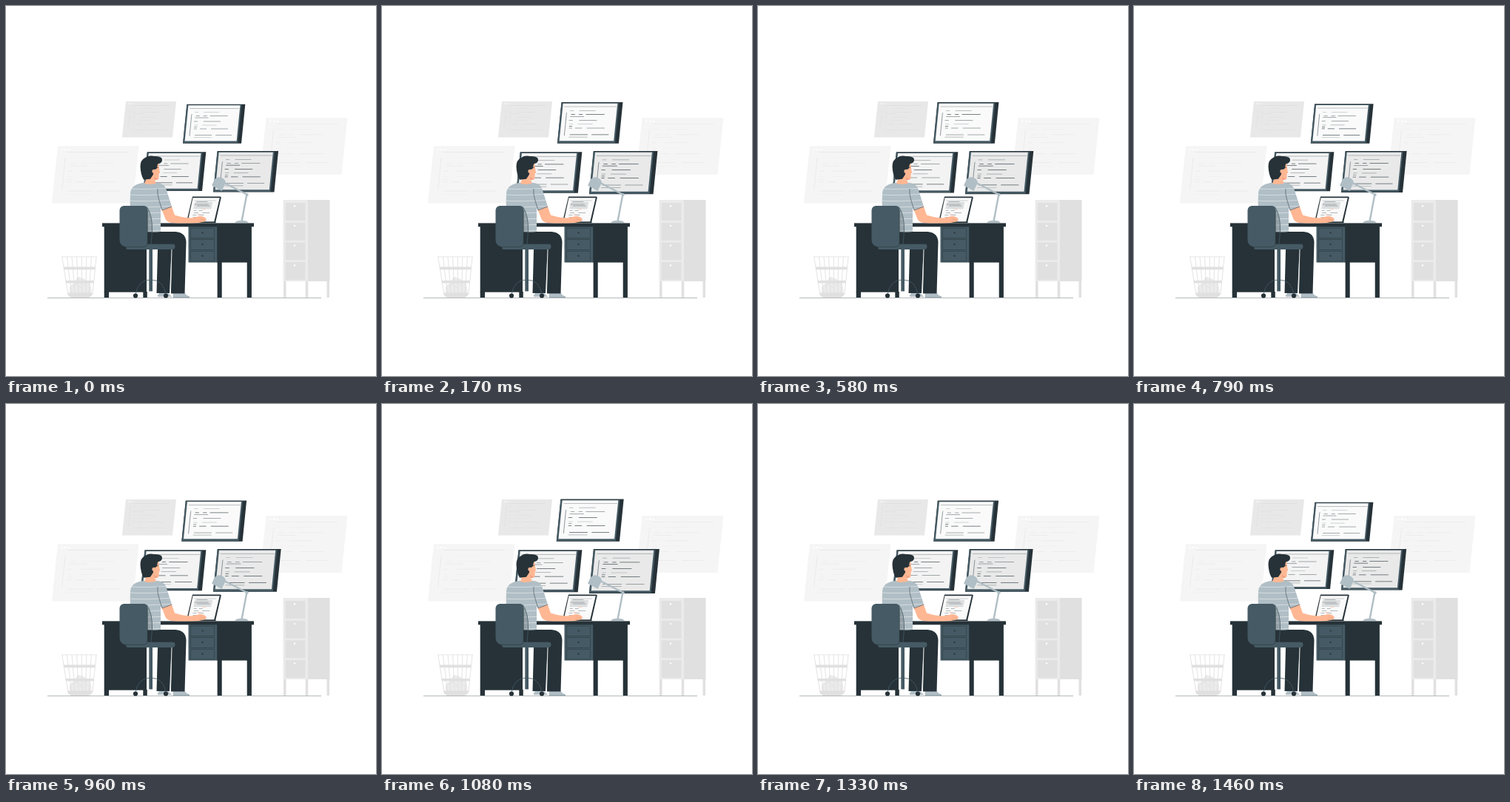
An HTML page with a canvas that plays this animation: 500x500 px, repeating every 1500 ms.

```html
<!DOCTYPE html>
<html lang="en">
<head>
<meta charset="utf-8">
<title>Developer at a desk</title>
<style>
html, body { margin: 0; width: 100%; height: 100%; overflow: hidden; background: #fff; }
canvas { display: block; width: 500px; height: 500px; }
</style>
</head>
<body>
<canvas id="stage" width="500" height="500"></canvas>
<script>
const ctx = document.getElementById('stage').getContext('2d');
const DARK = '#263238', SLATE = '#455a64', STEEL = '#b0bec5', SKIN = '#ffb793';
const PALE = '#f5f5f5', LIGHT = '#ebebeb', GREY = '#e0e0e0';
const LOOP = 1500;

// Monitor pulse: [time in ms, amount], linear between the points.
const PULSE = [[0, 0], [335, 1], [825, 0], [1145, 1], [1465, 0], [1500, 0]];

// Lines of code: [y, x0, x1, x0, x1, ...] on a 79 x 53 screen.
const CODE = [
  [10.5, 12, 17, 24, 45], [15.5, 14, 19, 24, 29, 33, 57], [18, 13, 31],
  [23, 12, 17, 25, 48], [28, 13, 18, 24, 43], [30.5, 13, 17],
  [33, 13, 17, 21, 30, 36, 59], [41.5, 15, 38, 43, 65], [44.5, 14, 38]
];

function rect(x, y, w, h, color) {
  ctx.fillStyle = color;
  ctx.fillRect(x, y, w, h);
}
function round(x, y, w, h, r, color) {
  ctx.beginPath();
  ctx.roundRect(x, y, w, h, r);
  ctx.fillStyle = color;
  ctx.fill();
}
function dot(x, y, r, color) {
  ctx.beginPath();
  ctx.arc(x, y, r, 0, Math.PI * 2);
  ctx.fillStyle = color;
  ctx.fill();
}
function shape(d, color) {
  ctx.fillStyle = color;
  ctx.fill(new Path2D(d));
}
function stroke(d, color, width = 0.6) {
  ctx.strokeStyle = color;
  ctx.lineWidth = width;
  ctx.stroke(new Path2D(d));
}
function slanted(x, y, slant, sx, sy, draw) {
  ctx.save();
  ctx.transform(sx, 0, -slant * sy, sy, x, y);
  draw();
  ctx.restore();
}

function codeLines(color, weight) {
  CODE.forEach(([y, ...xs], row) => {
    ctx.globalAlpha = row % 4 === 0 ? 0.4 : 0.8;
    for (let i = 0; i < xs.length; i += 2)
      rect(xs[i], y, xs[i + 1] - xs[i], weight, color);
  });
  ctx.globalAlpha = 1;
}

function backWindow(x, y, w, h, color, ink) {
  slanted(x, y, 0.105, w / 79, h / 53, () => {
    rect(0, 0, 79, 53, color);
    for (let i = 0; i < 3; i++) dot(4.5 + i * 3.3, 3.2, 0.85, '#fff');
    rect(10, 5.5, 60, 0.4, ink);
    stroke('M8.5 11V40', ink, 0.5);
    codeLines(ink, 0.5);
  });
}

// (ox, oy) is the fixed point of the pulse.
function monitor(x, y, w, h, ox, oy, screen, scale) {
  ctx.save();
  ctx.translate(ox, oy);
  ctx.scale(scale, scale);
  ctx.translate(-ox, -oy);
  slanted(x, y, 0.1, w / 79, h / 53, () => {
    rect(0, 0, 79, 53, DARK);
    rect(0.2, 0.9, 74, 51.5, SLATE);
    rect(2.3, 1.6, 70, 48.2, screen);
    rect(4.5, 5.5, 67, 0.5, '#7c8589');
    stroke('M8.4 13.5Q7.8 14 8 16V43', '#59646a', 0.6);
    codeLines(DARK, 0.6);
  });
  ctx.restore();
}

function trash() {
  shape('M86 388Q84 378 91 375L97 366 104 368 111 372Q117 380 115 388Z', LIGHT);
  stroke('M88 380L96 375 101 381 109 374M97 366L96 375', GREY);
  for (let i = 0; i < 8; i++) {
    const x = 75.8 + i * 6.6;
    stroke(`M${x} 339L${84 + i * 4.7} 390`, GREY, 0.9);
  }
  rect(75, 338.5, 48, 0.8, GREY);
  shape('M77.5 352.5H121L120.4 356.3H78.2Z', GREY);
  shape('M80.5 371H118.3L117.7 374.5H81.2Z', GREY);
  shape('M83 387.5H117Q116 394 111 394H89Q84 394 83 387.5Z', GREY);
}

function cabinet() {
  for (const x of [375, 404.7, 433.5]) rect(x, 371, 3.5, 23, GREY);
  rect(374.5, 262, 33.5, 110, LIGHT);
  rect(408, 262, 29.5, 110, GREY);
  for (let i = 0; i < 4; i++) {
    const y = 266 + i * 26.7;
    rect(377.5, y, 27, 24, GREY);
    dot(390, y + 4.3, 1.2, '#fff');
  }
}

function desk() {
  rect(132.7, 297, 57.3, 89.7, DARK);
  rect(132.7, 386, 6.3, 8, DARK);
  rect(185.3, 386, 5.5, 8, DARK);
  rect(285, 297, 41, 49.6, DARK);
  rect(285.6, 346, 6.1, 48, DARK);
  rect(325.7, 297, 6.2, 97, DARK);
  rect(246.5, 298, 38.7, 48.6, SLATE);
  for (let i = 0; i < 3; i++) {
    const y = 300 + i * 15.6;
    ctx.strokeStyle = DARK;
    ctx.lineWidth = 0.5;
    ctx.strokeRect(249.5, y, 32, 13.8);
    dot(265.5, y + 6.5, 1.1, DARK);
  }
  rect(130, 293.4, 205, 4.9, DARK);
}

function laptop() {
  shape('M252 257.5H289.5Q291 257.5 290.7 259L283 293H243.7Z', DARK);
  shape('M252.5 259.2H288.8L281.2 291.5H245.6Z', '#fafafa');
  slanted(252.5, 259.2, 0.22, 1, 1, () => {
    rect(3, 3.5, 29, 0.5, '#9aa2a6');
    rect(4, 5.5, 24, 9.5, '#dcdfe0');
    for (const [y, x, w] of [[5, 6, 15], [8.5, 4, 19], [10.5, 8, 17], [17, 5, 4],
      [17, 12, 5], [20, 6, 6], [20, 17, 10], [23, 5, 5], [23, 13, 7], [26, 6, 4]])
      rect(x, y, w, 0.6, '#687176');
    rect(16, 15.2, 5, 0.7, SKIN);
    rect(11, 22.3, 5, 0.7, SKIN);
  });
  rect(243.5, 291.7, 40, 1.5, DARK);
}

function lamp() {
  stroke('M318.5 291L325.3 255', STEEL, 2.4);
  stroke('M326 255L294 238.5', STEEL, 2.2);
  dot(325.7, 255, 2, STEEL);
  shape('M309.5 293Q310.5 289.7 318.5 289.7T327.5 293Z', STEEL);
  shape('M278 242.5L282 234Q286 230 291 231.8Q298 235 296.4 240L291.5 250Z', STEEL);
}

function person() {
  // Legs and shoes
  shape('M207 388H219L223 392H204.5Z', STEEL);
  shape('M226 387H241Q243 391 248 392.5V394H225.5Z', STEEL);
  stroke('M205 392.7H224M226 393.7H248', '#7f8f97', 0.6);
  shape('M190 305H229Q243 306 243.5 319L241.5 388.5H223L223.6 330 221 388H203.5L205 329H190Z', DARK);
  stroke('M224 329L222.3 388', '#e8ebec', 1);

  // Arm
  shape('M210 274L223.5 270 228 282.5Q240 286.5 251 286.5L262 284Q269 284 271 288.5L269.5 291 261 293Q240 294 224 293Q218 292.5 215.5 288Z', SKIN);
  stroke('M262 287.5L269 290M260 290.5L266 292', '#e49b78', 0.5);

  // Shirt
  const shirt = 'M185 239H205Q213 240 216 246L224 271 211 276 209 273V305Q190 307 169 302Q167 280 168 253Q169 241 185 239Z';
  shape(shirt, STEEL);
  ctx.save();
  ctx.clip(new Path2D(shirt));
  for (let y = 247; y < 304; y += 8.1)
    stroke(`M167 ${y}Q190 ${y + 1.3} 223 ${y - 1}`, '#e4eaed', 0.7);
  ctx.restore();
  stroke('M205 247Q204 254 207 263L211 276L224 271', DARK, 0.5);

  // Neck, face and hair
  shape('M187 240L192 227 200 211H206.3L206.7 218 208 225 206.6 227 206.5 233Q205 235.5 201 235L203 239.5Q196 242 187 240Z', SKIN);
  shape('M201 235L200 230Q202 234 206 234Z', '#e99d79');
  shape('M181.5 217Q181.5 208 188 205Q193 201.5 200 203Q206 202.5 210 205Q212.5 209 209 212L205 213.5 203.8 219.5 200 222 198.8 228 195 233.8 186 234.8Q182 228 181.5 217Z', DARK);
  dot(200, 223.3, 2.6, SKIN);
  stroke('M203.5 218.7L206 218', DARK, 0.7);
}

function chair() {
  rect(193.3, 328, 4.7, 57.5, SLATE);
  stroke('M175 390Q178 370 195.5 370T216 390', SLATE, 0.8);
  dot(175, 391.5, 3.1, DARK);
  dot(216, 391.5, 3.1, DARK);
  const support = 'M190 271Q198 282 197.5 304L196 322';
  shape(support + 'H190Z', 'rgba(38,50,56,0.2)');
  stroke(support, SLATE, 0.8);
  round(162, 321.7, 66.5, 7.3, [4, 3, 4, 3], SLATE);
  round(153.5, 270, 37.7, 55.5, [6, 5, 5, 9], SLATE);
  stroke('M162 325.5H186Q191 325 191.3 320V276', DARK, 0.5);
}

function pulseAt(time) {
  const i = PULSE.findIndex(([t]) => t > time);
  const [t0, v0] = PULSE[i - 1], [t1, v1] = PULSE[i];
  return v0 + (v1 - v0) * (time - t0) / (t1 - t0);
}

function draw(time) {
  const scale = 1 + 0.1 * pulseAt(time);
  rect(0, 0, 500, 500, '#fff');
  backWindow(162, 129, 68, 48.5, '#e8e8e8', '#dadada');
  backWindow(70, 189.3, 109.5, 77.2, PALE, '#e6e6e6');
  backWindow(351.5, 151, 110, 77, PALE, '#e6e6e6');
  cabinet();
  trash();
  rect(56, 394, 370, 0.8, '#a2a8aa');

  monitor(244.3, 132.7, 79, 53, 281, 185.7, '#fafafa', scale);
  monitor(190.7, 197.3, 79.6, 52.7, 269.3, 197.3, '#f3f3f3', scale);
  monitor(285.5, 196, 82.5, 55.5, 281.5, 196, '#e9e9e9', scale);

  desk();
  laptop();
  lamp();
  person();
  chair();
}

function tick() {
  draw(performance.now() % LOOP);
  requestAnimationFrame(tick);
}
tick();
</script>
</body>
</html>
```
